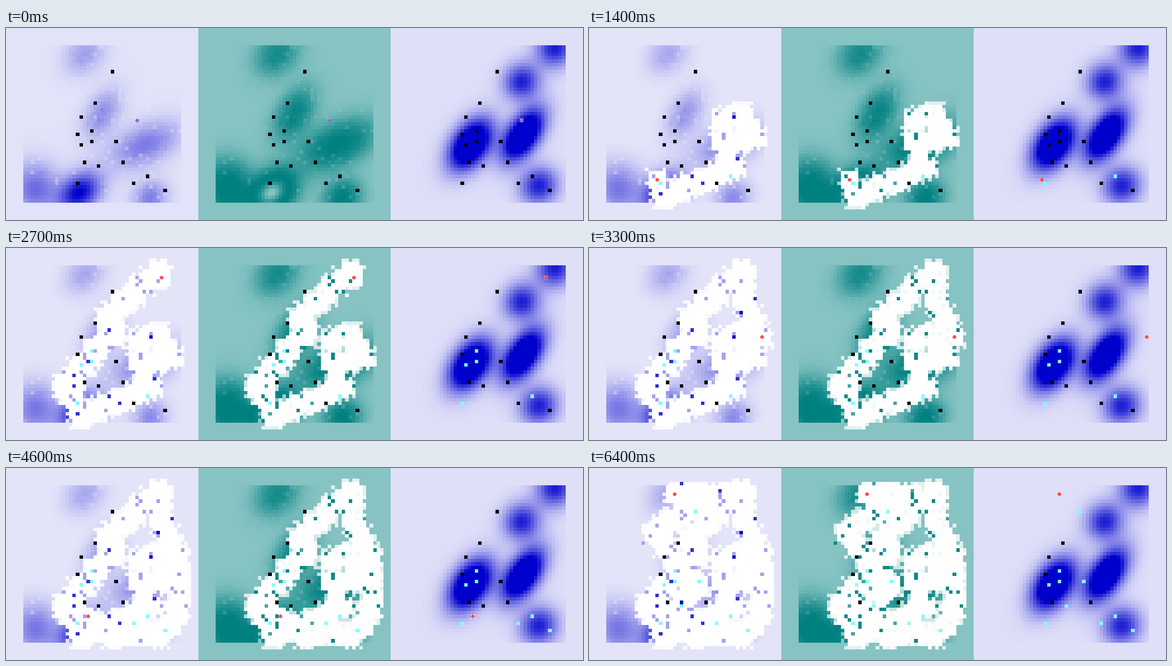
A matplotlib script that plays this animation: 1200 by 400 pixels, repeating every 6500 ms.

```python
import numpy as np
import matplotlib.pyplot as plt
from matplotlib.animation import FuncAnimation
from matplotlib.patches import Circle

N, PAD, STEPS = 55, 5, 65
WHITE, BLUE, TEAL, CYAN = np.array(
    [[255, 255, 255], [0, 0, 205], [0, 128, 128], [127, 255, 255]]) / 255
BLACK = np.zeros(3)
RED, PURPLE = "#ff4b4b", "#956ac4"

# Turning points of the search: step, column, row
TURNS = np.array([
    (0, 37, 26), (2, 43, 24), (4, 47, 31), (6, 37, 32), (7, 41, 39), (9, 37, 41),
    (13, 21, 48), (14, 19, 43), (16, 16, 39), (21, 31, 23), (22, 28, 20),
    (26, 43, 6), (27, 44, 8), (30, 44, 16), (33, 49, 25), (37, 49, 39),
    (39, 46, 45), (40, 43, 48), (42, 37, 46), (44, 30, 48), (46, 23, 42),
    (50, 31, 33), (54, 18, 18), (60, 37, 7), (64, 24, 7),
])
TARGETS = [(30, 12), (25, 21), (21, 25), (20, 30), (24, 29), (24, 32), (21, 33),
           (31, 32), (22, 38), (26, 39), (33, 38), (20, 44), (36, 44), (40, 42),
           (45, 46)]
FIND_RANGE = 2.5

rng = np.random.default_rng(7)
rows, cols = np.mgrid[:N, :N]
inside = (np.minimum(rows, cols) >= PAD) & (np.maximum(rows, cols) < N - PAD)


def position(step):
    at = [np.interp(step, TURNS[:, 0], TURNS[:, i]) for i in (1, 2)]
    return np.rint(at).astype(int)


path = [position(k) for k in range(STEPS)]


def found_at(target):
    """First step that comes close enough to the target."""
    return next((k for k, at in enumerate(path)
                 if np.hypot(*(at - target)) < FIND_RANGE), STEPS)


found = {t: found_at(t) for t in TARGETS}


def blob(x, y, long, short, angle, height):
    dx, dy = cols + 0.5 - x, y - rows - 0.5
    a = np.radians(angle)
    u = dx * np.cos(a) + dy * np.sin(a)
    v = dy * np.cos(a) - dx * np.sin(a)
    return height * np.exp(-0.5 * ((u / long) ** 2 + (v / short) ** 2))


def field(base, blobs):
    return base + inside * sum(blob(*b) for b in blobs)


def prior():
    extra = field(0, [
        (22.5, 7.5, 4.4, 3.4, 45, 0.235),
        (27.5, 24.5, 5.2, 3.0, 60, 0.29),
        (40, 33.3, 7.0, 3.8, 25, 0.35),
        (21, 47.2, 4.6, 3.4, 40, 0.8),
        (8.3, 46.0, 4.5, 5.0, 0, 0.42),
        (41.2, 48.7, 3.5, 3.0, 40, 0.35),
        (32, 37, 7, 6, 0, 0.03),
    ])
    speckle = 1 + 0.05 * rng.standard_normal((N, N))
    speckle[rng.random((N, N)) < 0.05] *= 0.6
    return np.minimum(0.1 + extra * np.where(extra < 0.3, speckle, 1), 0.9)


def sense(p, x, y, flaws):
    """Clear the cells around (x, y); flawed cells report something."""
    reach = np.maximum(abs(cols - x), abs(rows - y))
    core = reach <= 2
    rim = (reach == 3) & (rng.random((N, N)) < 0.3)
    p[core] = np.where(rng.random(core.sum()) < 0.06, 0.006, 0)
    p[rim] *= 0.15
    near = (core | rim) & (flaws > 0)
    p[near] = flaws[near]


def beliefs():
    p = prior()
    flaws = rng.choice([0, 0.35, 0.8, 0.98], (N, N), p=[0.955, 0.03, 0.012, 0.003])
    states = [p.copy()]
    for k in range(1, STEPS):
        for step in (k - 1, k - 0.5, k):
            sense(p, *position(step), flaws)
        states.append(p.copy())
    return states


def entropy(p):
    q = np.clip(p, 1e-6, 1 - 1e-6)
    return -q * np.log2(q) - (1 - q) * np.log2(1 - q)


def tint(value, color):
    v = np.clip(value, 0, 1)[..., None]
    return WHITE * (1 - v) + color * v


truth = tint(field(0.125, [
    (47, 5.8, 3.8, 3.6, 45, 0.77),
    (37.5, 15.4, 3.7, 3.5, 45, 0.76),
    (37.9, 30.7, 5.7, 3.0, 56, 1.5),
    (22.9, 33.4, 5.5, 3.4, 55, 1.5),
    (42.4, 45.2, 3.8, 3.6, 45, 0.76),
]), BLUE)
states = beliefs()


def scene(k):
    p = states[k]
    panels = [tint(p / p.max(initial=0.9), BLUE), tint(entropy(p), TEAL), truth.copy()]
    x, y = path[k]
    for panel in panels:
        for c, r in TARGETS:
            panel[r, c] = CYAN if k >= found[c, r] else BLACK
        panel[y, x] = WHITE
    return np.hstack(panels)


fig = plt.figure(figsize=(12, 4), dpi=100)
ax = fig.add_axes([0, 0, 1, 1])
image = ax.imshow(scene(0), extent=(0, 3 * N, N, 0), interpolation="nearest",
                  aspect="auto")
ax.axis("off")
dots = [ax.add_patch(Circle((0, 0), 0.52, lw=0)) for _ in range(3)]


def update(k):
    image.set_data(scene(k))
    x, y = path[k]
    for i, dot in enumerate(dots):
        dot.center = (x + 0.5 + i * N, y + 0.5)
        dot.set_facecolor(RED if k else PURPLE)
    return [image, *dots]


anim = FuncAnimation(fig, update, frames=STEPS, interval=100, repeat=True,
                     repeat_delay=0)
plt.show()
```
